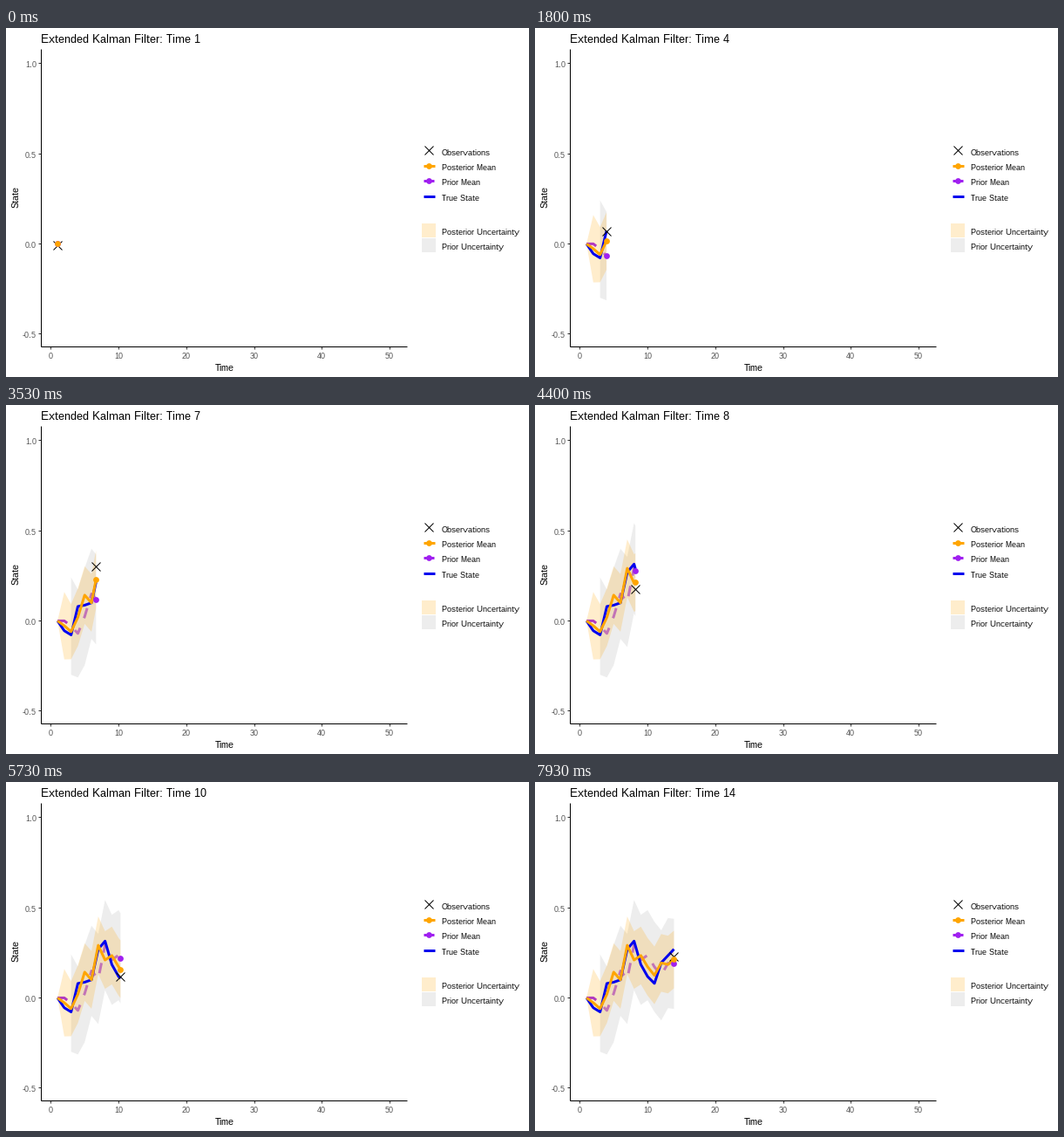
Write a matplotlib script that moves like this. It is 600 by 400 pixels and loops after 8 s.

```python
import numpy as np
import matplotlib.pyplot as plt
from matplotlib.animation import FuncAnimation
from matplotlib.patches import Polygon, Rectangle

plt.rcParams.update({
    "font.family": ["Liberation Sans", "DejaVu Sans"],
    "text.hinting": "native",
    "text.hinting_factor": 1,
    "axes.unicode_minus": False,
})

W, H, DPI = 600, 400, 72
FRAMES, LOOP = 120, 8000
STEP = 49 / 449          # time units revealed per frame

ORANGE, PURPLE, BLUE = "#FFA500", "#A020F0", "#0000EE"
GREY, TEXT, TICK = "#D3D3D3", "#4D4D4D", "#333333"

# Filter series, one value per time step
steps = np.arange(1, 15)
true = np.array([0, -.055, -.078, .08, .087, .1, .27, .315, .185, .118,
                 .08, .195, .235, .275])
post = np.array([0, -.027, -.06, .02, .143, .1, .292, .21, .235, .172,
                 .125, .194, .185, .217])
prior = np.array([0, 0, -.029, -.07, .024, .15, .105, .293, .211, .237,
                  .172, .125, .193, .188])
post_sd = np.full(14, .16)
post_sd[:3] = 0, .187, .153
prior_sd = np.full(14, .25)
prior_sd[2:5] = .27, .244, .27
gain = np.full(14, .605)
gain[1:3] = .7
obs = prior + (post - prior) / gain
obs[0] = -.006


def px(t):
    return 51.3 + 7.792 * np.asarray(t)


def py(v):
    return 247.4 - 206.5 * np.asarray(v)


fig = plt.figure(figsize=(W / DPI, H / DPI), dpi=DPI, facecolor="white")
ax = fig.add_axes([0, 0, 1, 1])
ax.set_xlim(0, W)
ax.set_ylim(H, 0)
ax.axis("off")


def line(x, y, color, width=3, z=2, **kw):
    return ax.plot(x, y, color=color, lw=width, zorder=z,
                   solid_capstyle="butt", dash_capstyle="butt",
                   solid_joinstyle="round", dash_joinstyle="round", **kw)[0]


def dot(x, y, color, z):
    return ax.plot([x], [y], "o", color=color, ms=6.8, mew=0, zorder=z)[0]


def cross(x, y, z=7):
    return ax.plot([x], [y], "x", color="black", ms=9.4, mew=1, zorder=z)[0]


def ribbon(color, alpha, z):
    return ax.add_patch(Polygon([(0, 0)] * 3, fc=color, alpha=alpha, lw=0,
                                zorder=z))


def label(x, y, s, size=9, color="black", **kw):
    return ax.text(x, y, s, fontsize=size, color=color, zorder=10, **kw)


# Axes; whole coordinates snap to the pixel they name
line([40, 40], [24, 365], "black", 1, 9)
line([40, 460], [365, 365], "black", 1, 9)
for v in (-.5, 0, .5, 1):
    y = np.floor(py(v))
    line([37, 40], [y, y], TICK, 1, 8)
    label(35, y + 5, f"{v:.1f}", color=TEXT, ha="right")
for t in range(0, 51, 10):
    x = np.floor(px(t))
    line([x, x], [365, 368], TICK, 1, 8)
    label(x, 379, str(t), color=TEXT, ha="center")
label(251, 393, "Time", 11, ha="center")
label(12, 194, "State", 11, rotation=90, ha="center", va="center")
title = label(40, 17, "", 13)

# Legend
KEY = 485.2
cross(KEY, 140.4)
for y, color, dash in ((158, ORANGE, "-"), (175, PURPLE, (0, (4, 4))),
                       (193, BLUE, "-")):
    line([479, 492], [y, y], color, linestyle=dash)
dot(KEY, 158, ORANGE, 8)
dot(KEY, 175, PURPLE, 8)
for y, color, alpha in ((224, ORANGE, .2), (241, GREY, .4)):
    ax.add_patch(Rectangle((477, y), 16, 16, fc=color, alpha=alpha, lw=0))
for y, s in ((146, "Observations"), (163, "Posterior Mean"),
             (180, "Prior Mean"), (198, "True State"),
             (237, "Posterior Uncertainty"), (254, "Prior Uncertainty")):
    label(500, y, s)

# Moving parts, bottom to top
prior_line = line([], [], PURPLE, z=1, linestyle=(0, (4, 4)))
prior_band = ribbon(GREY, .4, 2)
post_band = ribbon(ORANGE, .2, 3)
true_line = line([], [], BLUE, z=4)
post_line = line([], [], ORANGE, z=5)
obs_mark = cross(0, 0, 6)
prior_dot = dot(0, 0, PURPLE, 7)
post_dot = dot(0, 0, ORANGE, 8)


def reveal(t, start=1):
    done = steps[(steps >= start) & (steps < t)]
    return np.append(done, t) if t >= start else np.array([])


def set_band(band, t, mean, sd, start):
    ts = reveal(t, start)
    band.set_visible(len(ts) > 1)
    if len(ts) > 1:
        top = py(np.interp(ts, steps, mean + sd))
        low = py(np.interp(ts, steps, mean - sd))
        x = px(ts)
        band.set_xy(np.column_stack([np.append(x, x[::-1]),
                                     np.append(top, low[::-1])]))


def update(k):
    t = 1 + k * STEP
    ts = reveal(t)
    for ln, vals in ((true_line, true), (post_line, post),
                     (prior_line, prior)):
        ln.set_data(px(ts), py(np.interp(ts, steps, vals)))
    for mark, vals in ((obs_mark, obs), (prior_dot, prior), (post_dot, post)):
        mark.set_data([px(t)], [py(np.interp(t, steps, vals))])
    set_band(prior_band, t, prior, prior_sd, 3)
    set_band(post_band, t, post, post_sd, 1)
    title.set_text(f"Extended Kalman Filter: Time {round(t)}")
    return []


anim = FuncAnimation(fig, update, frames=FRAMES, interval=LOOP / FRAMES,
                     init_func=lambda: update(0), repeat=True,
                     repeat_delay=0, blit=False)
plt.show()
```
